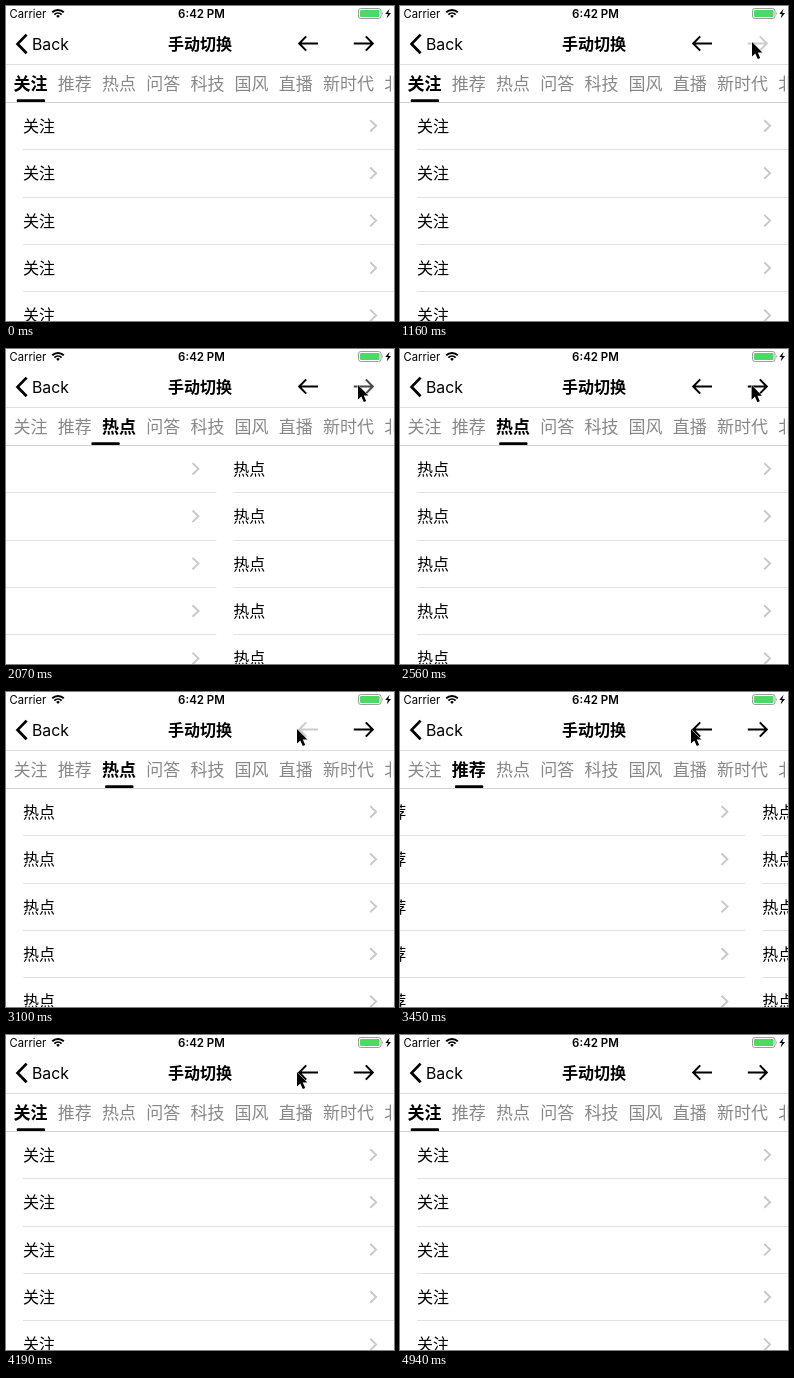
Animation, 388 px wide and 315 px high, one loop 5.27 s. Source, as an HTML page:

```html
<!DOCTYPE html>
<html lang="zh-CN">
<head>
<meta charset="utf-8">
<title>手动切换</title>
<style>
  html, body { margin: 0; width: 100%; height: 100%; overflow: hidden; background: #fff; }
  svg { display: block; width: 100vw; height: 100vh; }
  text { font-family: Inter, "Noto Sans CJK SC", "Noto Sans CJK", sans-serif; }
  .cjk { font-family: "Noto Sans CJK SC", "Noto Sans CJK", sans-serif; }
  .tab { font-size: 17px; fill: #888; }
  .tab.on { fill: #000; font-weight: 700; }
  .row { font-size: 16px; }
  .line { fill: none; stroke: #000; stroke-width: 2; }
  .sep { fill: #e2e2e4; }
  .chevron { fill: none; stroke: #c7c7cc; stroke-width: 1.9; }
</style>
</head>
<body>
<svg viewBox="0 0 388 315">
  <rect width="388" height="315" fill="#fff"/>
  <g id="pages"></g>

  <text x="3.6" y="12" font-size="11.2">Carrier</text>
  <g fill="none" stroke="#000" stroke-width="1.9">
    <path d="M46.2 6.3a8.3 8.3 0 0 1 11.6 0"/>
    <path d="M48.4 8.6a5.1 5.1 0 0 1 7.2 0"/>
    <path d="M50.2 9.9a2.6 2.6 0 0 1 3.6 0L52 11.9z" fill="#000" stroke="none"/>
  </g>
  <text x="195.5" y="12" font-size="11.5" font-weight="600" text-anchor="middle">6:42 PM</text>
  <rect x="352.5" y="2.5" width="22.5" height="10" rx="2.4" fill="#fff" stroke="#929292" stroke-width=".9"/>
  <rect x="354" y="4" width="19.5" height="7" rx="1.2" fill="#4cd964"/>
  <path d="M376 5.8q1.6 1.7 0 3.4z" fill="#929292"/>
  <path d="M383.6 2.8l-4.3 5.2h2.6l-1.3 4.4 4.4-5.4h-2.7z"/>

  <path class="line" stroke-width="3" style="stroke-width:2.8" d="M20.6 28.6L11.6 37.9l9 9.3"/>
  <text x="26" y="43.8" font-size="15.8">Back</text>
  <text class="cjk" x="194" y="43.8" font-size="16" font-weight="700" text-anchor="middle">手动切换</text>
  <path id="prev" class="line" d="M293.3 37.5H312M300.2 30.4l-7 7.1 7 7.1"/>
  <path id="next" class="line" d="M347.8 37.5h18.8M359.8 30.4l7 7.1-7 7.1"/>
  <rect y="58" width="388" height="1" fill="#dedede"/>

  <g id="tabs"></g>
  <rect y="96" width="388" height="1" fill="#d2d2d4"/>
  <rect id="bar" y="93.3" width="28.4" height="2.8" rx="1.2"/>
  <path id="cursor" d="M0 0V14.6l3.3-3.1 2.5 5.6 2.4-1-2.4-5.5h4.6z" fill="#000" stroke="#fff" stroke-width="1" stroke-linejoin="round" paint-order="stroke"/>
</svg>
<script>
const LOOP = 5270, WIDTH = 388, PITCH = 44.2, ROW = 47.4;
const SLIDE = 320, BAR = 240, FADE = 230;
const names = ['关注', '推荐', '热点', '问答', '科技', '国风', '直播', '新时代', '北京'];

// Each tap: press time, slide start, direction
const taps = [
  { press: 1160, start: 1250, step: 1 },
  { press: 1840, start: 1920, step: 1 },
  { press: 3100, start: 3197, step: -1 },
  { press: 3630, start: 3840, step: -1 }
];

// Cursor moves: time span, end points, bend and easing
const moves = [
  { t0: 370, t1: 740, from: [365, 315], to: [352, 36], bend: [3, 0], ease: p => 1 - (1 - p) ** 2 },
  { t0: 2550, t1: 2780, from: [352, 36], to: [291, 37], bend: [0, 2], ease: smooth },
  { t0: 4370, t1: 4940, from: [291, 37], to: [373, 316], bend: [30, -25], ease: smooth }
];

const $ = id => document.getElementById(id);
const clamp = v => Math.min(1, Math.max(0, v));
const span = (t, start, length) => clamp((t - start) / length);
function smooth(p) { return p * p * (3 - 2 * p); }

function add(parent, tag, attrs, content = '') {
  const el = document.createElementNS('http://www.w3.org/2000/svg', tag);
  for (const key in attrs) el.setAttribute(key, attrs[key]);
  el.textContent = content;
  return parent.appendChild(el);
}

let tabX = 7.6;
const tabs = names.map(name => {
  const tab = add($('tabs'), 'text', { class: 'cjk tab', x: tabX, y: 84 }, name);
  tabX += PITCH + (name.length - 2) * 17;
  return tab;
});

names.slice(0, 3).forEach((name, i) => {
  const page = add($('pages'), 'g', { transform: `translate(${i * WIDTH})` });
  for (let r = 0; r < 5; r++) {
    const y = 119.8 + r * ROW;
    add(page, 'text', { class: 'cjk row', x: 17, y: y + 6 }, name);
    add(page, 'path', { class: 'chevron', d: `M364.2 ${y - 5.7}l5.9 5.7-5.9 5.7` });
    add(page, 'rect', { class: 'sep', x: 17, y: Math.round(y + 23.4), width: WIDTH - 17, height: 1 });
  }
});

function arrowOpacity(t, step) {
  const tap = taps.filter(a => a.step === step && t >= a.press).pop();
  return tap ? 0.2 + 0.8 * span(t, tap.start, FADE) : 1;
}

function moveCursor(t) {
  const move = moves.filter(m => t >= m.t0).pop();
  const last = moves[moves.length - 1];
  const shown = move && t < last.t1;
  $('cursor').style.display = shown ? '' : 'none';
  if (!shown) return;
  const p = move.ease(span(t, move.t0, move.t1 - move.t0));
  const [x, y] = [0, 1].map(k =>
    move.from[k] + (move.to[k] - move.from[k]) * p + move.bend[k] * 4 * p * (1 - p) * 0.5);
  $('cursor').setAttribute('transform', `translate(${x} ${y})`);
}

function draw(t) {
  let page = 0, bar = 0, active = 0;
  for (const { start, step } of taps) {
    page += step * smooth(span(t, start, SLIDE));
    bar += step * smooth(span(t, start, BAR));
    if (t >= start) active += step;
  }
  $('pages').setAttribute('transform', `translate(${-page * WIDTH})`);
  $('bar').setAttribute('x', 10.7 + bar * PITCH);
  tabs.forEach((tab, i) => tab.classList.toggle('on', i === active));
  $('prev').style.opacity = arrowOpacity(t, -1);
  $('next').style.opacity = arrowOpacity(t, 1);
  moveCursor(t);
}

const begin = performance.now();
function tick() {
  draw((performance.now() - begin) % LOOP);
  requestAnimationFrame(tick);
}
tick();
</script>
</body>
</html>
```
